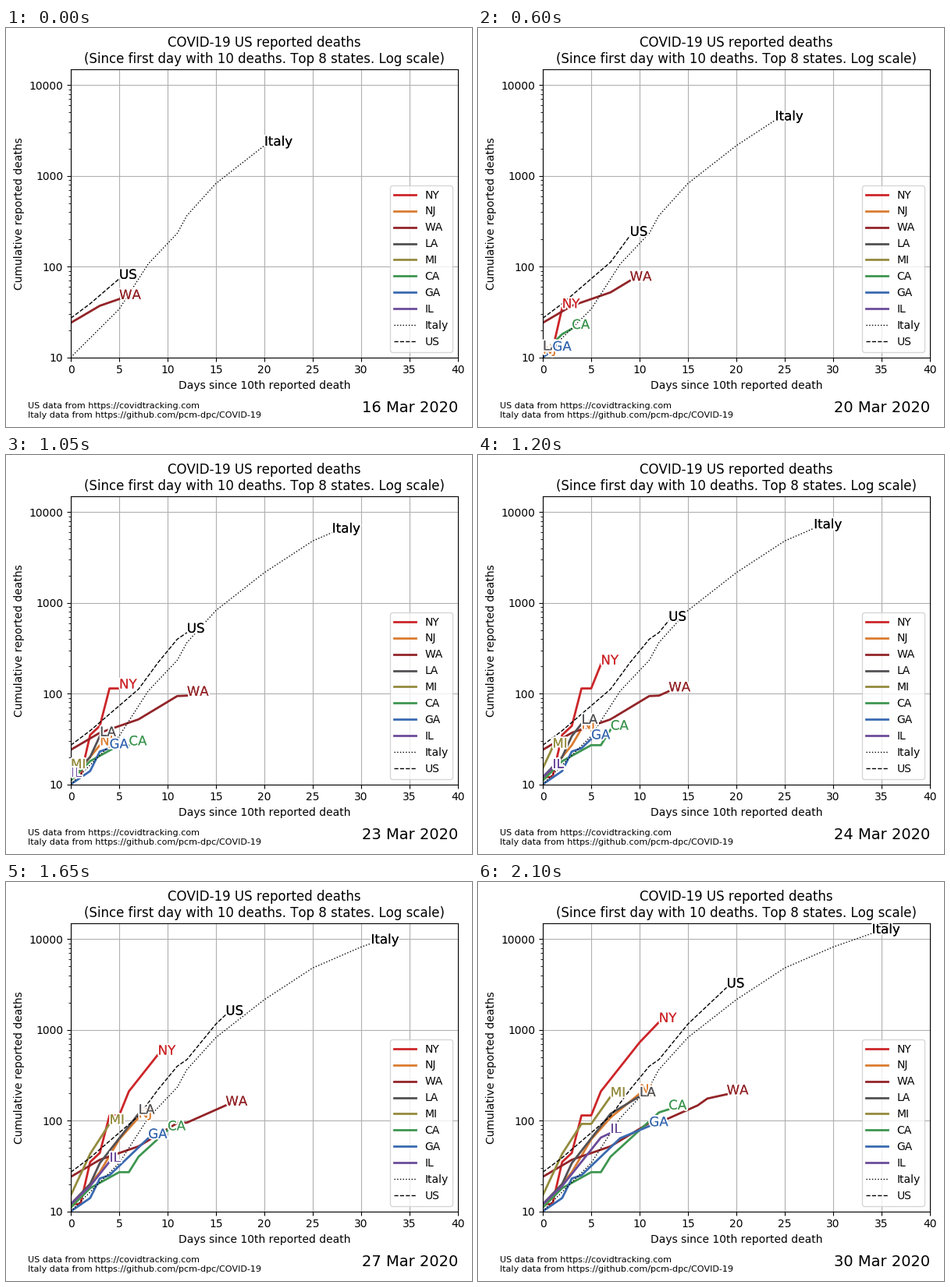
Animation of 597 by 512 pixels, one loop 4650 ms. Source, as a matplotlib script:

```python
import matplotlib.pyplot as plt
import numpy as np
from matplotlib.animation import FuncAnimation
from matplotlib.patheffects import Normal, withStroke
from matplotlib.ticker import FormatStrFormatter, NullFormatter

W, H, DPI = 597, 512, 100
LAST = 14      # 16 to 30 March
FRAMES = 31    # the last day is held
STEP_MS = 150

plt.rcParams["font.family"] = "DejaVu Sans"
plt.rcParams["text.kerning_factor"] = 6
fig = plt.figure(figsize=(W / DPI, H / DPI), dpi=DPI, facecolor="white")
ax = fig.add_axes([83 / W, 89.45 / H, 496 / W, 369.6 / H])

ax.set_yscale("log")
ax.set_xlim(0, 40)
ax.set_ylim(10, 15000)
ax.yaxis.set_major_formatter(FormatStrFormatter("%d"))
ax.yaxis.set_minor_formatter(NullFormatter())
ax.grid(True)
ax.set_title("COVID-19 US reported deaths\n"
             "(Since first day with 10 deaths. Top 8 states. Log scale)",
             fontsize=12)
ax.set_xlabel("Days since 10th reported death")
ax.set_ylabel("Cumulative reported deaths")

halo = [withStroke(linewidth=3, foreground="white"), Normal()]
curves = []


def add(name, color, keys, style="-", width=2):
    """Add a curve of constant growth between {day: deaths} key points."""
    days = np.arange(max(keys) + 1)
    deaths = np.exp(np.interp(days, list(keys), np.log(list(keys.values()))))
    line, = ax.plot([], [], style, color=color, lw=width, label=name)
    tag = ax.text(0, 10, name, color=color, fontsize=12, path_effects=halo)
    curves.append((line, tag, days, deaths))


add("NY", "#cc2529", {0: 12, 1: 12, 2: 35, 3: 44, 4: 114, 5: 114,
                      6: 210, 10: 728, 12: 1218})
add("NJ", "#da7c30", {0: 11, 3: 27, 5: 62, 7: 108, 10: 198})
add("WA", "#922428", {0: 24, 3: 37, 7: 52, 11: 94, 12: 95,
                      16: 147, 17: 175, 19: 195})
add("LA", "#535154", {0: 12, 2: 20, 3: 34, 7: 119, 10: 185})
add("MI", "#948b3d", {0: 15, 2: 43, 4: 92, 5: 92, 7: 184})
add("CA", "#3e9651", {0: 11, 2: 18, 5: 27, 6: 27, 7: 40, 12: 123, 13: 133})
add("GA", "#396ab1", {0: 10, 2: 14, 3: 23, 4: 25, 8: 64, 11: 87})
add("IL", "#6b4c9a", {0: 12, 2: 19, 6: 65, 7: 73})
add("Italy", "black", {0: 10, 5: 34, 8: 107, 11: 233, 12: 366, 15: 827,
                       20: 2158, 25: 4825, 30: 8215, 34: 11591}, ":", 1)
add("US", "black", {0: 27, 2: 39, 7: 112, 9: 219, 11: 398, 12: 471,
                    15: 1163, 19: 2939}, "--", 1)

ax.legend(loc="lower right")
fig.text(28 / W, 10 / H,
         "US data from https://covidtracking.com\n"
         "Italy data from https://github.com/pcm-dpc/COVID-19",
         fontsize=8, va="bottom", linespacing=1.3)
date = fig.text(579 / W, 19 / H, "", fontsize=14, ha="right", va="baseline")


def update(i):
    today = min(i, LAST)
    date.set_text(f"{16 + today} Mar 2020")
    for line, tag, days, deaths in curves:
        # every curve ends on the last day
        n = max(0, len(days) - (LAST - today))
        line.set_data(days[:n], deaths[:n])
        tag.set_visible(n > 0)
        if n:
            tag.set_position((days[n - 1], deaths[n - 1]))
    return [date] + [artist for c in curves for artist in c[:2]]


anim = FuncAnimation(fig, update, frames=FRAMES, interval=STEP_MS,
                     init_func=lambda: update(0), repeat=True,
                     repeat_delay=0, blit=False)
plt.show()
```
